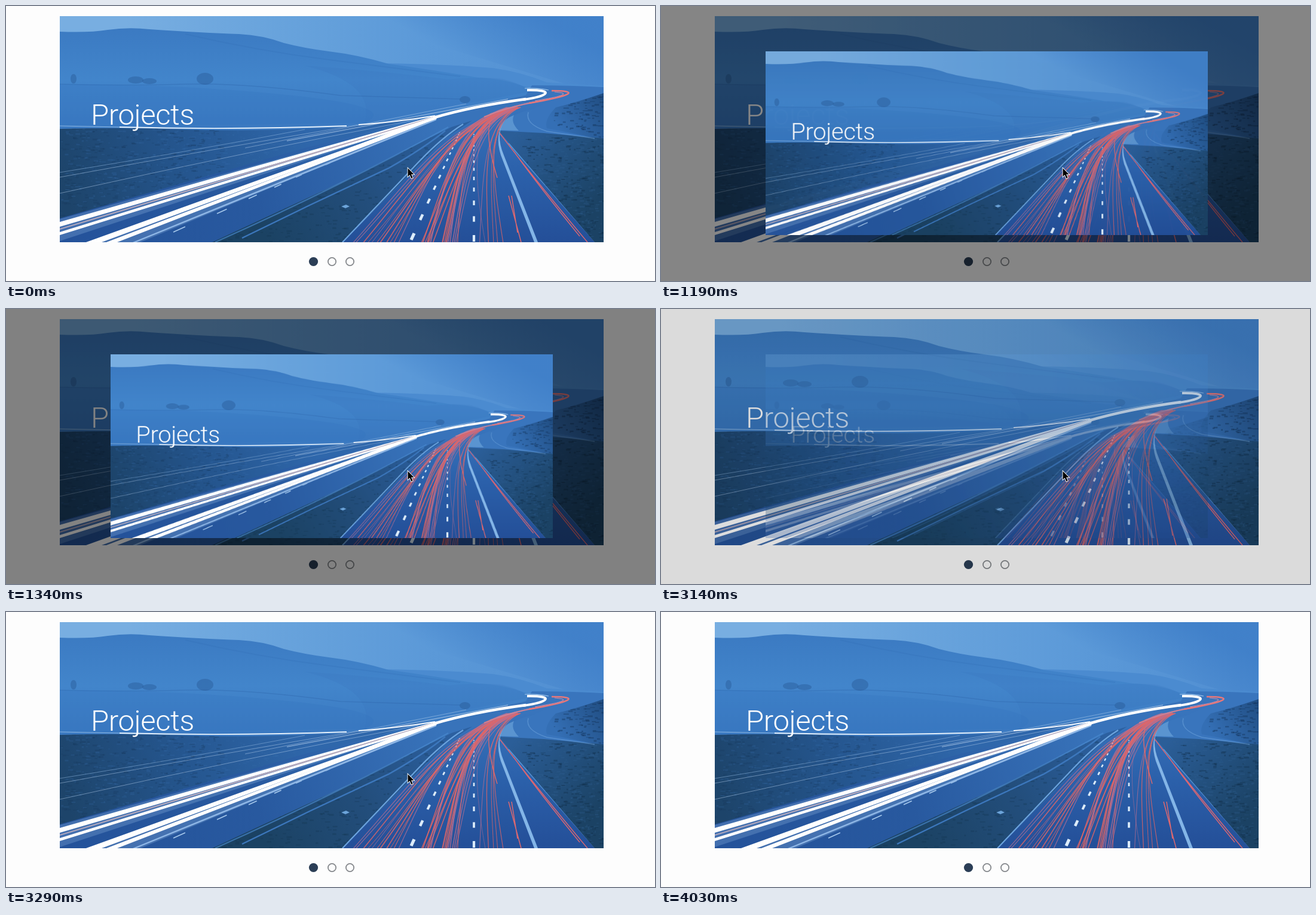
Animation, 1086 px wide and 461 px high, one loop 4630 ms. Source, as an HTML page with a canvas:

```html
<!DOCTYPE html>
<html lang="en">
<head>
<meta charset="utf-8">
<style>
  html, body { margin: 0; width: 100%; height: 100%; overflow: hidden; background: #fdfdfd; }
  canvas { display: block; }
</style>
</head>
<body>
<canvas id="stage" width="1086" height="461"></canvas>
<script>
const LOOP = 4630;
const SLIDE = { x: 90, y: 17, w: 910, h: 379 };
const POPUP = { x: 175, y: 76, w: 740, h: 308 };
// [start ms, popup fade, pointer x, pointer y]
const STEPS = [
  [0, 0, 672, 272], [1050, .4, 672, 272], [1190, .97, 672, 272], [1340, 1, 672, 272],
  [2990, .96, 672, 272], [3140, .27, 672, 272], [3290, 0, 672, 272],
  [3740, 0, 914, 428], [3890, 0, 1036, 445], [4030, 0, -50, -50]
];

const stage = document.getElementById('stage').getContext('2d');
const picture = document.createElement('canvas');
picture.width = SLIDE.w;
picture.height = SLIDE.h;
const g = picture.getContext('2d');
g.translate(-SLIDE.x, -SLIDE.y);   // draw the picture in stage coordinates

let seed = 7;
const random = () => (seed = seed * 16807 % 2147483647) / 2147483647;

function gradient(x0, y0, x1, y1, ...colors) {
  const fill = g.createLinearGradient(x0, y0, x1, y1);
  colors.forEach((c, i) => fill.addColorStop(i / (colors.length - 1), c));
  return fill;
}
function area(path, fill) {
  g.fillStyle = fill;
  g.fill(new Path2D(path));
}
function line(path, color, width = 1) {
  g.strokeStyle = color;
  g.lineWidth = width;
  g.stroke(new Path2D(path));
}
// Scattered tufts of grass inside a shape
function grass(path, x, y, w, h, count, color) {
  g.save();
  g.clip(new Path2D(path));
  g.fillStyle = color;
  for (let i = 0; i < count; i++)
    g.fillRect(x + random() * w, y + random() * h, 2 + random() * 7, 1 + random() * 2);
  g.restore();
}

function drawLand() {
  area('M90 17H1000V396H90Z', gradient(200, 60, 960, 60, '#78aee1', '#68a3dc', '#5b99d8', '#518fd2'));
  area('M560 17H1000V150Z', gradient(800, 110, 860, 0, 'rgba(62,126,200,0)', 'rgba(62,126,200,.85)'));
  area('M600 96Q720 96 815 104Q860 110 905 128L1000 134V180H600Z', '#4b8bd0');
  area('M90 43Q140 45 170 40Q205 35 240 39Q330 45 390 47Q430 49 465 62Q500 71 540 76Q590 82 640 97Q720 108 790 120Q840 122 880 140V230H90Z',
    gradient(0, 37, 0, 210, '#3b7ac2', '#4285cb', '#3a78c0'));
  area('M500 100Q640 110 740 123Q800 118 830 122Q855 128 880 143L600 195Q620 130 500 100Z', 'rgba(56,116,188,.22)');
  line('M90 131Q200 134 300 131T560 150L760 156', 'rgba(42,94,162,.3)', 1.5);
  line('M300 47Q420 75 540 90T760 118', 'rgba(50,108,178,.25)', 2);
  area('M90 131Q300 131 480 150T600 196L90 202Z', 'rgba(50,112,186,.25)');

  const meadow = 'M90 206Q200 203 300 207T570 203L700 184L500 245L90 362Z';
  area(meadow, gradient(100, 320, 500, 190, '#1d446a', '#25568f', '#2f67ab'));
  grass(meadow, 90, 205, 270, 150, 420, 'rgba(22,54,88,.25)');
  grass(meadow, 90, 205, 400, 130, 420, 'rgba(58,112,174,.22)');

  // bushes
  g.fillStyle = 'rgba(38,84,146,.4)';
  for (const [x, y, rx, ry] of [[333, 122, 14, 10], [217, 124, 13, 6], [240, 126, 12, 5], [113, 122, 5, 8], [768, 157, 9, 6]]) {
    g.beginPath();
    g.ellipse(x, y, rx, ry, 0, 0, 7);
    g.fill();
  }

  area('M880 133Q945 133 1000 136V230H820Z', '#3975bd');
  area('M1000 146Q950 163 920 170Q900 190 905 205L1000 224Z', gradient(920, 200, 1000, 150, '#346fb5', '#214e83'));
  grass('M1000 148L920 170L915 200L1000 222Z', 910, 148, 90, 75, 110, 'rgba(22,54,94,.45)');

  // carriageways and verges
  area('M90 356L500 238L720 183L890 145L915 152L820 184L735 212L350 396H90Z',
    gradient(90, 390, 720, 180, '#24529a', '#28599f', '#3873ba'));
  const median = 'M345 396L560 296L745 203L780 192L735 222L563 396Z';
  area(median, gradient(440, 396, 740, 200, '#1b4263', '#234e7c', '#2c60a0'));
  grass(median, 350, 200, 390, 196, 400, 'rgba(18,50,78,.3)');
  area('M563 396L735 222Q790 180 900 157L945 149Q850 180 822 210L985 396Z',
    gradient(0, 170, 0, 396, '#3874bc', '#2b60aa', '#244f98'));
  area('M822 209Q840 180 880 174Q868 200 900 211L1000 226V250L825 216Z', '#3a76bd');
  const verge = 'M824 209L900 213L1000 222V396H985Z';
  area(verge, gradient(850, 215, 980, 340, '#2b5e98', '#1b4264'));
  grass(verge, 835, 212, 165, 184, 420, 'rgba(48,98,148,.25)');
  grass(verge, 860, 220, 140, 176, 260, 'rgba(16,44,70,.35)');
  area('M823 208Q830 190 850 183Q844 195 858 209Z', 'rgba(112,168,222,.6)');
  line('M874 178Q868 198 905 210L985 222', 'rgba(112,166,222,.5)', 1.5);

  line('M350 396Q560 302 740 203', 'rgba(75,139,207,.65)', 2);
  line('M395 389L510 333L640 272Q700 238 735 209', '#3c77bc', 2.5);
  area('M561 336l8-3 6 3-7 3z', '#6ca4da');
}

function drawRoadMarks() {
  line('M563 396L690 262Q730 220 765 198', '#6ba3de', 2.2);
  area('M884 396L828 250Q817 215 835 192Q818 214 833 250L890 396Z', '#83b5e7');
  for (const [x, y] of [[280, 379], [353, 348], [406, 323], [449, 304], [485, 287], [535, 266]])
    line(`M${x} ${y}l${(y - 200) / 9} ${(200 - y) / 20}`, '#a9cbed', 1.6);
  // lane dashes shrink with distance
  for (let i = 0, y = 392; i < 14; i++, y = 196 + (y - 196) * .83) {
    const size = (y - 196) / 196, x = 766 - 88 * size;
    line(`M${x} ${y}l${4 * size + 1} ${-10 * size - 1}`, '#dcecfa', 1.2 + 4 * size);
    line(`M783 ${y + 3}v${-10 * size - 1}`, '#dcecfa', 1.2 + 3 * size);
  }
}

function drawHeadlights() {
  const haze = 'rgba(178,204,234,.5)';
  line('M90 287Q330 243 590 199', haze);
  line('M90 279Q300 245 500 207', 'rgba(150,188,228,.5)');
  line('M90 314Q400 245 690 190', haze);
  line('M400 238L770 164', haze);
  line('M470 226L840 156', 'rgba(178,204,234,.6)', 1.5);
  line('M190 203Q380 208 570 201', '#e4f0fb', 1.8);
  line('M90 201L190 203', '#8db9e5');
  line('M590 199Q650 195 718 184', '#f4f9ff', 2.2);

  // each beam: two corners at the near edge, narrowing to the bend
  const beam = (x0, y0, x1, y1, color, end = 186) =>
    area(`M${x0} ${y0}Q${(x0 + 720) / 2} ${(y0 + end) / 2 - 2} 720 ${end - 1.5}V${end + 1.5}Q${(x1 + 720) / 2} ${(y1 + end) / 2} ${x1} ${y1}Z`, color);
  beam(90, 357, 90, 394, 'rgba(140,178,222,.3)');
  beam(134, 396, 225, 396, 'rgba(140,178,222,.3)', 188);
  beam(90, 362, 90, 370, '#fff', 185);
  beam(90, 373, 90, 375, '#b3a9bd', 186);
  beam(90, 379, 90, 384, '#fff', 187);
  beam(134, 396, 160, 396, '#fff', 187);
  beam(168, 396, 186, 396, '#fff', 188);
  beam(212, 396, 218, 396, '#8fb7e6', 190);
  line('M560 247Q640 214 720 187', '#fff', 5);
  line('M715 187.5C780 168 840 160 870 156', '#fff', 4.5);
  line('M865 157C910 151 918 140 872 141', '#fff', 4);
  line('M868 138Q890 137 908 141', '#9dc5ec', 1.2);
}

function drawTaillights() {
  const trail = (x, color, width) => {
    const lean = 785 - x, sway = random() * 24 - 12;
    line(`M${x} 396C${x + lean * .5 + sway} 280 ${785 - lean * .24 + sway} 197 ${850 + sway} 170`, color, width);
  };
  const group = (from, to, count, width) => {
    for (let i = 0; i < count; i++)
      trail(from + (to - from) * (i + random() * .6) / count,
        random() < .65 ? 'rgba(228,102,100,.8)' : 'rgba(186,112,146,.7)', width * (.6 + random() * .7));
  };
  group(578, 665, 11, 1.4);
  group(694, 716, 7, 1.9);
  group(730, 758, 9, 1.9);
  group(792, 836, 6, 1.2);
  line('M822 288Q800 215 812 190', '#dc686c', 1.4);
  line('M862 396L841 318M856 380L846 318', '#dc6870', 1.5);
  line('M973 396Q880 285 826 213M960 386Q890 300 850 244', '#d96672', 1.4);
  line('M800 186Q840 169 890 160', '#d87e88', 2);
  line('M810 181Q850 166 900 158', '#c0849f', 1.3);
  line('M875 163C950 150 960 142 913 142', '#e6777a', 2.6);
  line('M885 159C935 151 945 146 918 144', '#c08aa8', 1.2);
}

function drawPicture() {
  drawLand();
  drawRoadMarks();
  drawHeadlights();
  drawTaillights();
  g.font = '300 49px Roboto, "Liberation Sans", sans-serif';
  g.letterSpacing = '-.4px';
  g.fillStyle = '#fff';
  g.fillText('Projects', 142, 199);
}

function drawDots() {
  [514.5, 545.5, 575.5].forEach((x, i) => {
    stage.beginPath();
    stage.arc(x, 428.5, i ? 6.6 : 7.6, 0, 7);
    stage.fillStyle = '#2b3e56';
    stage.strokeStyle = '#85888c';
    stage.lineWidth = 1.8;
    i ? stage.stroke() : stage.fill();
  });
}

const arrow = new Path2D('M.5 0V14L3.7 11L6.3 17L8.6 16L6 10.3H10.6Z');
function drawPointer(x, y) {
  stage.save();
  stage.translate(x, y);
  stage.strokeStyle = '#fff';
  stage.lineWidth = 1.8;
  stage.stroke(arrow);
  stage.fillStyle = '#000';
  stage.fill(arrow);
  stage.restore();
}

function place(box) {
  stage.drawImage(picture, box.x, box.y, box.w, box.h);
}

function render(now) {
  const time = now % LOOP;
  const [, fade, x, y] = STEPS.findLast(step => step[0] <= time);
  stage.fillStyle = '#fdfdfd';
  stage.fillRect(0, 0, 1086, 461);
  place(SLIDE);
  drawDots();
  stage.fillStyle = `rgba(0,0,0,${fade * .49})`;
  stage.fillRect(0, 0, 1086, 461);
  stage.globalAlpha = fade;
  place(POPUP);
  stage.globalAlpha = 1;
  drawPointer(x, y);
}

drawPicture();
const start = performance.now();
(function tick() {
  render(performance.now() - start);
  requestAnimationFrame(tick);
})();
</script>
</body>
</html>
```
